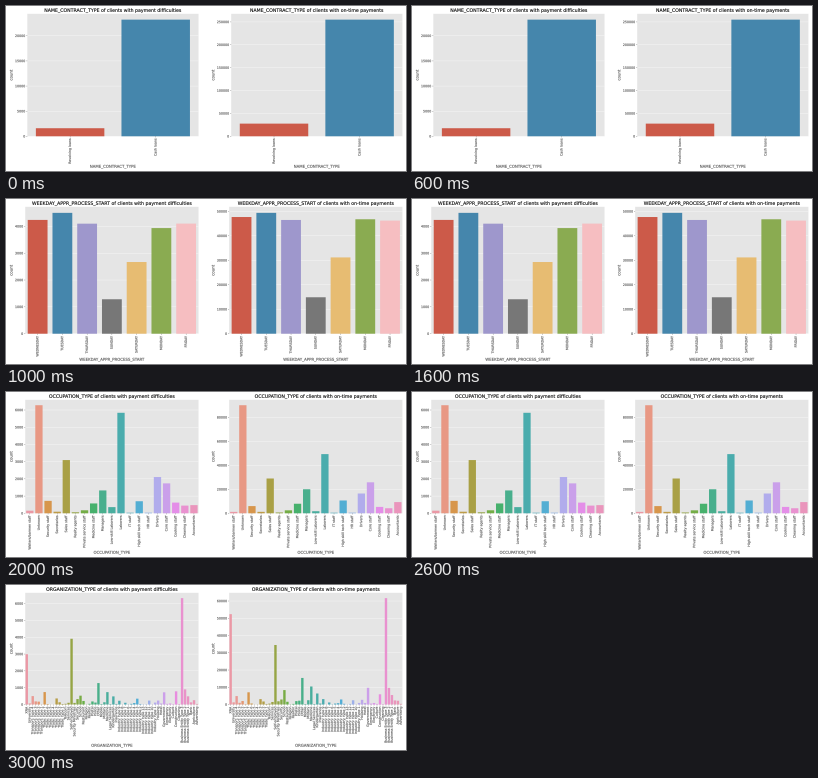
These frames come from a looping animation (400x165 px, 4 s). A matplotlib script:

```python
import colorsys

import matplotlib.pyplot as plt
import numpy as np
from matplotlib.animation import FuncAnimation
from matplotlib.colors import to_rgb
from matplotlib.patches import PathPatch, Rectangle
from matplotlib.textpath import TextPath
from matplotlib.transforms import Affine2D

W, H = 400, 165
PT = 0.3236  # pixels per point of the chart layout
TITLE, LABEL, TICK = 14.4 * PT, 12 * PT, 10 * PT
ASCENT, DESCENT, DIGIT = 0.76, 0.236, 0.636  # in units of the font size
TICK_LEN, TICK_PAD, LABEL_PAD, TITLE_PAD, HAIR = 3.5 * PT, 7 * PT, 4 * PT, 6 * PT, PT
AXES_PAD = 40 * PT
MARGIN_X, MARGIN_Y = 3.6, 2.33
TOP = MARGIN_Y + ASCENT * TITLE + TITLE_PAD
GREY = "#555555"
CYCLE = ["#E24A33", "#348ABD", "#988ED5", "#777777", "#FBC15E", "#8EBA42", "#FFB5B8"]

# Category: (clients with payment difficulties, clients paying on time)
CONTRACTS = {"Revolving loans": (1604, 27675), "Cash loans": (23221, 255011)}

WEEKDAYS = {
    "WEDNESDAY": (4238, 47696), "TUESDAY": (4501, 49400),
    "THURSDAY": (4098, 46493), "SUNDAY": (1283, 14898),
    "SATURDAY": (2670, 31182), "MONDAY": (3934, 46780),
    "FRIDAY": (4101, 46237),
}

OCCUPATIONS = {
    "Waiters/barmen staff": (152, 1196), "Unknown": (6278, 90113),
    "Security staff": (722, 5999), "Secretaries": (92, 1213),
    "Sales staff": (3092, 29010), "Realty agents": (59, 692),
    "Private service staff": (175, 2477), "Medicine staff": (572, 7965),
    "Managers": (1328, 20043), "Low-skill Laborers": (359, 1734),
    "Laborers": (5838, 49348), "IT staff": (34, 492),
    "High skill tech staff": (701, 10679), "HR staff": (36, 527),
    "Drivers": (2107, 16496), "Core staff": (1738, 25832),
    "Cooking staff": (621, 5325), "Cleaning staff": (447, 4206),
    "Accountants": (474, 9339),
}

ORGANIZATIONS = {
    "XNA": (2990, 52384), "University": (65, 1262),
    "Transport: type 4": (501, 4897), "Transport: type 3": (187, 1000),
    "Transport: type 2": (172, 2032), "Transport: type 1": (9, 192),
    "Trade: type 7": (740, 7091), "Trade: type 6": (29, 602),
    "Trade: type 5": (3, 46), "Trade: type 4": (2, 62),
    "Trade: type 3": (361, 3131), "Trade: type 2": (133, 1767),
    "Trade: type 1": (31, 317), "Telecom": (44, 533),
    "Services": (104, 1471), "Self-employed": (3908, 34504),
    "Security Ministries": (96, 1878), "Security": (324, 2923),
    "School": (526, 8367), "Restaurant": (212, 1599),
    "Religion": (5, 80), "Realtor": (42, 354),
    "Postal": (182, 1975), "Police": (117, 2224),
    "Other": (1275, 15408), "Mobile": (29, 288),
    "Military": (135, 2499), "Medicine": (737, 10456),
    "Legal Services": (24, 281), "Kindergarten": (484, 6396),
    "Insurance": (34, 563), "Industry: type 9": (225, 3143),
    "Industry: type 8": (3, 21), "Industry: type 7": (105, 1202),
    "Industry: type 6": (8, 104), "Industry: type 5": (41, 558),
    "Industry: type 4": (89, 788), "Industry: type 3": (348, 2930),
    "Industry: type 2": (33, 425), "Industry: type 13": (9, 58),
    "Industry: type 12": (14, 355), "Industry: type 11": (234, 2470),
    "Industry: type 10": (7, 102), "Industry: type 1": (115, 924),
    "Housing": (235, 2723), "Hotel": (62, 904),
    "Government": (726, 9678), "Emergency": (40, 520),
    "Electricity": (63, 887), "Culture": (21, 358),
    "Construction": (785, 5936), "Cleaning": (29, 231),
    "Business Entity Type 3": (6323, 61669), "Business Entity Type 2": (900, 9653),
    "Business Entity Type 1": (487, 5497), "Bank": (130, 2377),
    "Agriculture": (257, 2197), "Advertising": (35, 394),
}

# Column name, data, tick steps of the two charts
PAGES = [
    ("NAME_CONTRACT_TYPE", CONTRACTS, (5000, 50000)),
    ("WEEKDAY_APPR_PROCESS_START", WEEKDAYS, (1000, 10000)),
    ("OCCUPATION_TYPE", OCCUPATIONS, (1000, 20000)),
    ("ORGANIZATION_TYPE", ORGANIZATIONS, (1000, 10000)),
]
GROUPS = ("payment difficulties", "on-time payments")


def husl(hue, sat=0.9, light=70):
    """RGB of an evenly bright hue at a share of the strongest chroma in gamut."""
    to_linear = np.array([[3.2406, -1.5372, -0.4986],
                          [-0.9689, 1.8758, 0.0415],
                          [0.0557, -0.2040, 1.0570]])
    angle = np.radians(359 * hue)

    def linear_rgb(chroma):
        u = chroma * np.cos(angle) / (13 * light) + 0.19783
        v = chroma * np.sin(angle) / (13 * light) + 0.46832
        y = ((light + 16) / 116) ** 3 + 0 * u
        x = 9 * y * u / (4 * v)
        z = y * (12 - 3 * u - 20 * v) / (4 * v)
        return to_linear @ np.array([x, y, z])

    chroma = np.linspace(0, 200, 1001)
    rgb = linear_rgb(chroma)
    inside = ((rgb >= 0) & (rgb <= 1)).all(axis=0)
    rgb = np.clip(linear_rgb(sat * chroma[inside].max()), 0, 1)
    return np.where(rgb > 0.0031308, 1.055 * rgb ** (1 / 2.4) - 0.055, 12.92 * rgb)


def desaturate(color, share=0.75):
    h, l, s = colorsys.rgb_to_hls(*to_rgb(color))
    return colorsys.hls_to_rgb(h, l, s * share)


def palette(n):
    if n <= len(CYCLE):
        return [desaturate(c) for c in CYCLE[:n]]
    return [desaturate(husl((i / n + 0.01) % 1)) for i in range(n)]


fig = plt.figure(figsize=(W / 100, H / 100), dpi=100, facecolor="white")
ax = fig.add_axes([0, 0, 1, 1])
ax.set(xlim=(0, W), ylim=(H, 0))
ax.axis("off")


def box(x, y, w, h, color):
    ax.add_patch(Rectangle((x, y), w, h, fc=color, lw=0, snap=False))


def text_path(s, size):
    return TextPath((0, 0), s, size=size, prop={"family": "DejaVu Sans"})


def text(x, y, s, size, color=GREY, align=0.5, angle=0):
    """Write s with its baseline through (x, y); align 0 is left, 1 is right."""
    path = text_path(s, size)
    extent = path.get_extents()
    place = (Affine2D().translate(-extent.x0 - align * extent.width, 0)
             .rotate_deg(angle).scale(1, -1).translate(x, y))
    # The hairline outline gives the small letters their weight
    ax.add_patch(PathPatch(place.transform_path(path), fc=color, ec=color,
                           lw=0.07, snap=False))


def top_of(counts):
    return 1.05 * max(counts)


def tick_width(counts, step):
    widest = int(top_of(counts) // step * step)
    return DIGIT * TICK * len(str(widest))


def layout(data, steps):
    """Left edges of both axes, their common width and their bottom."""
    ticks = [tick_width(c, s) for c, s in zip(zip(*data.values()), steps)]
    label_room = (ASCENT + DESCENT) * LABEL + LABEL_PAD + TICK_PAD
    first = MARGIN_X + label_room + ticks[0]
    gap = label_room + ticks[1] + AXES_PAD
    width = (W - MARGIN_X - first - gap) / 2
    longest = max(text_path(name, TICK).get_extents().width for name in data)
    return (first, first + width + gap), width, H - MARGIN_Y - label_room - longest


def count_plot(name, group, labels, counts, left, width, bottom, step):
    limit = top_of(counts)
    scale = (bottom - TOP) / limit
    pitch = width / len(counts)
    middle = left + width / 2

    box(left, TOP, width, bottom - TOP, "#E5E5E5")
    for value in range(0, int(limit) + 1, step):
        y = bottom - value * scale
        box(left, y - HAIR / 2, width, HAIR, "white")
        box(left - TICK_LEN, y - HAIR / 2, TICK_LEN, HAIR, GREY)
        text(left - TICK_PAD, y + 0.365 * TICK, str(value), TICK, align=1)

    for i, (label, count, color) in enumerate(zip(labels, counts, palette(len(counts)))):
        x = left + (i + 0.5) * pitch
        box(x - 0.4 * pitch, bottom - count * scale, 0.8 * pitch, count * scale, color)
        box(x - HAIR / 2, bottom, HAIR, TICK_LEN, GREY)
        text(x + 0.26 * TICK, bottom + TICK_PAD, label, TICK, align=1, angle=90)

    label_x = left - TICK_PAD - tick_width(counts, step) - LABEL_PAD - DESCENT * LABEL
    text(label_x, (TOP + bottom) / 2, "count", LABEL, angle=90)
    text(middle, H - MARGIN_Y - DESCENT * LABEL, name, LABEL)
    text(middle, TOP - TITLE_PAD, f"{name} of clients with {group}", TITLE, "black")


def draw(frame):
    for patch in list(ax.patches):
        patch.remove()
    name, data, steps = PAGES[frame]
    lefts, width, bottom = layout(data, steps)
    for group, counts, left, step in zip(GROUPS, zip(*data.values()), lefts, steps):
        count_plot(name, group, data, counts, left, width, bottom, step)
    return ax.patches


anim = FuncAnimation(fig, draw, frames=len(PAGES), init_func=lambda: draw(0),
                     interval=1000, repeat=True, repeat_delay=0)
plt.show()
```
